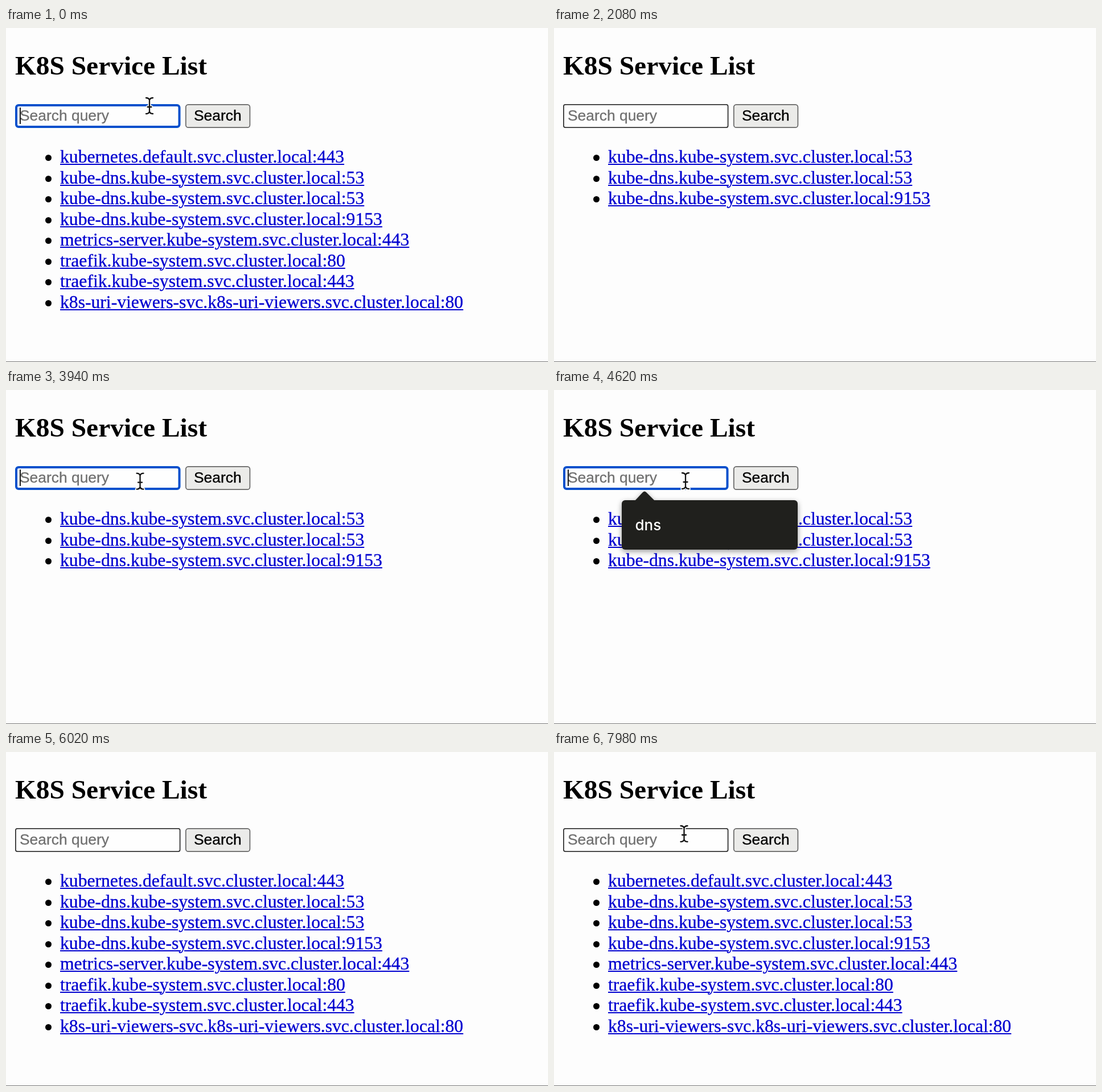
An HTML page that plays this animation: 952 by 588 pixels, repeating every 8 s.

```html
<!DOCTYPE html>
<html lang="en">
<head>
<meta charset="utf-8">
<title>Service List</title>
<style>
html, body { margin: 0; width: 100%; height: 100%; overflow: hidden; background: #fdfdfd; }
#stage { position: absolute; left: 0; top: 0; width: 952px; height: 588px; overflow: hidden; }
svg { position: absolute; left: 0; top: 0; }
ul { position: absolute; left: 95px; top: 209px; margin: 0; padding: 0; list-style: none;
  font: 31.65px/36.57px "Liberation Serif", "Times New Roman", serif; white-space: nowrap; }
li { position: relative; height: 36.57px; color: #0000d0; -webkit-text-stroke: .3px #0000d0;
  text-decoration: underline 2.2px; text-underline-offset: 2px; }
li::before { content: ""; position: absolute; left: -26.5px; top: 14px; width: 11px; height: 11px;
  border-radius: 50%; background: #000; }
svg text { white-space: pre; }
.title { font: bold 47.4px "Liberation Serif", "Times New Roman", serif; }
.ui { font: 26.4px "Liberation Sans", Arial, sans-serif; stroke-width: .3px; }
.tip { font: 500 26px Inter, sans-serif; fill: #fff; }
#popup { filter: drop-shadow(0 3px 5px rgba(0, 0, 0, .4)); }
</style>
</head>
<body>
<div id="stage">
  <ul id="list"></ul>
  <svg width="952" height="588" viewBox="0 0 952 588">
    <rect y="587" width="952" height="1" fill="#777"/>
    <text class="title" x="16" y="82">K8S Service List</text>
    <rect id="field" fill="#fefefe"/>
    <text id="query" class="ui" x="24" y="163"></text>
    <rect id="caret" y="140" width="1.8" height="29"/>
    <rect x="315.8" y="134.8" width="112.6" height="40.4" rx="4.5" fill="#ebebe9" stroke="#666" stroke-width="1.7"/>
    <text class="ui" x="330" y="163" stroke="#000">Search</text>
    <g id="popup">
      <path d="M142 195 L156 180 Q159 177 162 180 L177 195 Z" fill="#20201d"/>
      <rect x="119" y="194" width="309" height="87" rx="6" fill="#20201d"/>
      <text class="tip" x="142.5" y="247">dns</text>
    </g>
    <g id="mouse" fill="none" stroke-linecap="round">
      <path id="halo" stroke="#fff" stroke-width="5.5"/>
      <path id="beam" stroke="#111" stroke-width="2.3"/>
    </g>
  </svg>
</div>
<script>
const $ = id => document.getElementById(id);
const LOOP = 8000, BLINK = 500;

const services = [
  "kubernetes.default:443",
  "kube-dns.kube-system:53",
  "kube-dns.kube-system:53",
  "kube-dns.kube-system:9153",
  "metrics-server.kube-system:443",
  "traefik.kube-system:80",
  "traefik.kube-system:443",
  "k8s-uri-viewers-svc.k8s-uri-viewers:80"
].map(s => s.replace(":", ".svc.cluster.local:"));

// Each step changes some of the page state; "key" restarts the caret blink.
const steps = [
  { t: 0, text: "", focus: true, filter: "", popup: false, mouse: true, key: true },
  { t: 480, text: "d", mouse: false, key: true },
  { t: 700, text: "dn", key: true },
  { t: 980, text: "dns", key: true },
  { t: 1960, text: "", focus: false, filter: "dns" },
  { t: 2700, mouse: true },
  { t: 3700, focus: true, key: true },
  { t: 4200, popup: true, key: true },
  { t: 5560, mouse: false },
  { t: 5900, popup: false },
  { t: 5960, focus: false, filter: "" },
  { t: 7500, mouse: true }
];

const track = [
  [0, 252, 137], [2700, 252, 137], [3150, 238, 161], [3700, 238, 161],
  [4300, 231, 160], [7500, 231, 160], [7900, 228.5, 144], [8000, 228.5, 144]
];

function stateAt(t) {
  const state = {};
  for (const step of steps) {
    if (step.t > t) break;
    Object.assign(state, step);
    if (step.key) state.since = step.t;
  }
  return state;
}

function mouseAt(t) {
  const i = track.findIndex(p => p[0] > t);
  const [t0, x0, y0] = track[i - 1], [t1, x1, y1] = track[i];
  const u = (t - t0) / (t1 - t0), e = u * u * (3 - 2 * u);
  return [x0 + (x1 - x0) * e, y0 + (y1 - y0) * e];
}

function set(el, attrs) {
  for (const name in attrs) el.setAttribute(name, attrs[name]);
}

const show = (el, on) => { el.style.display = on ? "" : "none"; };

function drawField(focus) {
  const w = focus ? 4 : 1.8;
  set($("field"), {
    x: 16 + w / 2, y: 134 + w / 2, width: 290.5 - w, height: 42 - w,
    rx: focus ? 4 : 3, stroke: focus ? "#0450cc" : "#333", "stroke-width": w
  });
}

let shown = null;
function drawList(filter) {
  if (filter === shown) return;
  shown = filter;
  $("list").replaceChildren(...services.filter(s => s.includes(filter)).map(s => {
    const li = document.createElement("li");
    li.textContent = s;
    return li;
  }));
}

function drawQuery(text) {
  const query = $("query"), color = text ? "#000" : "#707070";
  query.textContent = text || "Search query";
  set(query, { fill: color, stroke: color });
  $("caret").setAttribute("x", 24 + (text ? query.getComputedTextLength() : 0));
}

const beam = "M-6 -14 Q-1 -14 0 -10 Q1 -14 6 -14 M0 -10 V10 M-6 14 Q-1 14 0 10 Q1 14 6 14 M-3.5 2 H3.5";
set($("halo"), { d: beam });
set($("beam"), { d: beam });

function render(t) {
  const s = stateAt(t);
  drawList(s.filter);
  drawField(s.focus);
  drawQuery(s.text);
  show($("caret"), s.focus && (t - s.since) % (2 * BLINK) < BLINK);
  show($("popup"), s.popup);
  show($("mouse"), s.mouse);
  $("mouse").setAttribute("transform", `translate(${mouseAt(t)})`);
}

const start = performance.now();
function tick() {
  render((performance.now() - start) % LOOP);
  requestAnimationFrame(tick);
}
tick();
</script>
</body>
</html>
```
